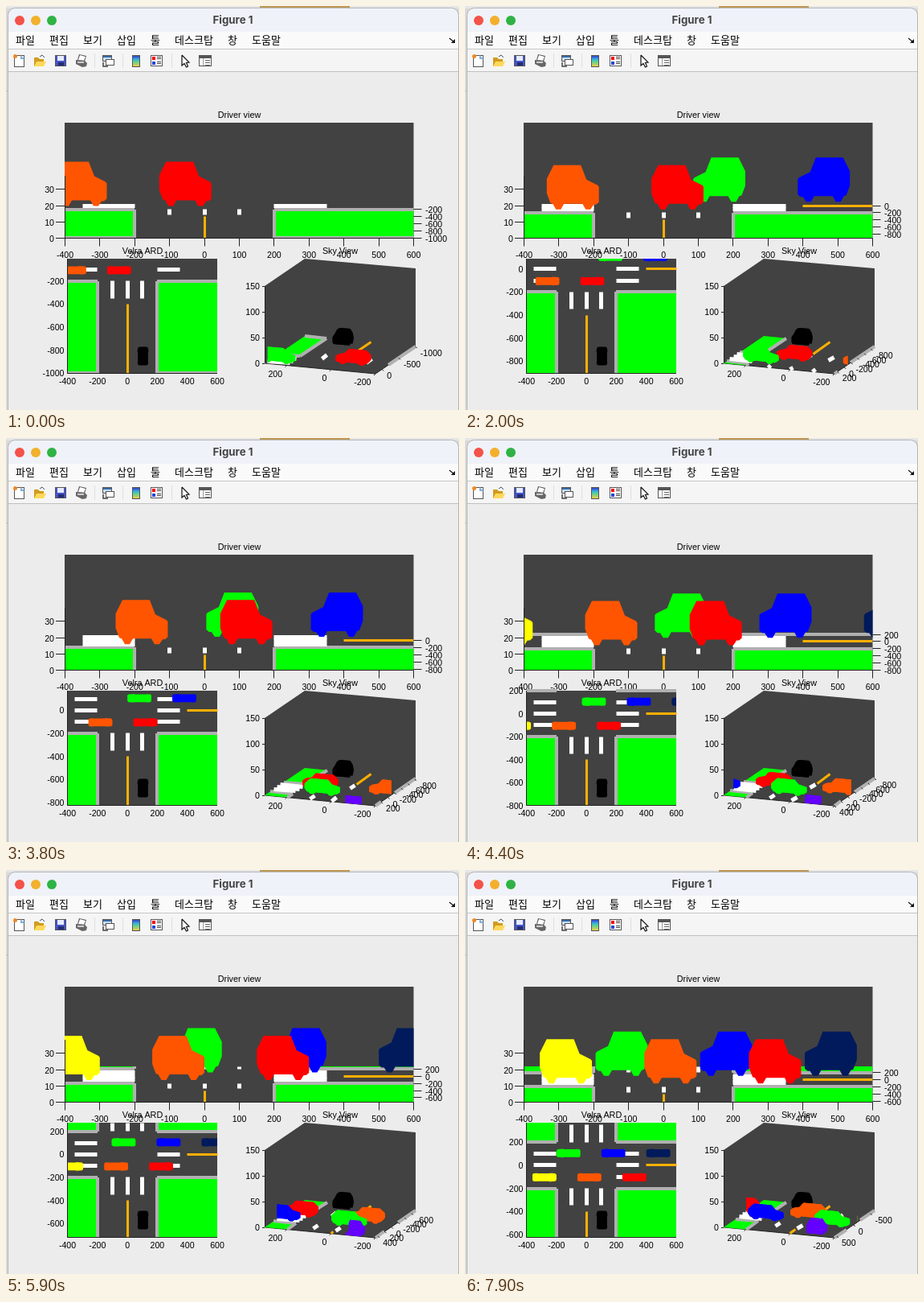
These frames come from a looping animation (564 by 502 pixels, 8000 ms). An HTML page with a canvas:

```html
<!DOCTYPE html>
<html lang="ko">
<head>
<meta charset="utf-8">
<style>
html, body { margin: 0; width: 100%; height: 100%; overflow: hidden; background: #ececec; }
canvas { display: block; width: 564px; height: 502px; }
</style>
</head>
<body>
<canvas id="c" width="564" height="502"></canvas>
<script>
const g = document.getElementById('c').getContext('2d');
const PLOT = '"Liberation Sans", Arial, sans-serif';
const UI = '"Noto Sans CJK KR", "Noto Sans CJK", sans-serif';
const DARK = '#424242', GREEN = '#00ff00', GRAY = '#b0b0b0', WHITE = '#fff', AMBER = '#ffb000';
const RED = '#ff0000', ORANGE = '#ff5500', YELLOW = '#ffff00', BLUE = '#0000ff', NAVY = '#001a5c', VIOLET = '#6400ff';

function rect(color, x, y, w, h) { g.fillStyle = color; g.fillRect(x, y, w, h); }
function poly(color, pts) {
  g.beginPath();
  pts.forEach(p => g.lineTo(p[0], p[1]));
  g.closePath();
  g.fillStyle = color;
  g.fill();
}
function line(color, width, ...pts) {
  g.beginPath();
  pts.forEach(p => g.lineTo(p[0], p[1]));
  g.strokeStyle = color;
  g.lineWidth = width;
  g.stroke();
}
function dot(color, x, y, r) {
  g.beginPath();
  g.arc(x, y, r, 0, 7);
  g.fillStyle = color;
  g.fill();
}
function text(s, x, y, align = 'center', font = '10.8px ' + PLOT, color = '#000') {
  g.font = font;
  g.textAlign = align;
  g.textBaseline = 'alphabetic';
  g.fillStyle = color;
  g.fillText(s, x, y);
}
const label = (v, x, y, align) => text(String(v), x, y + 4, align, '10.6px ' + PLOT);
function clipped(x, y, w, h, draw) {
  g.save();
  g.beginPath();
  g.rect(x, y, w, h);
  g.clip();
  draw();
  g.restore();
}
function ticks(lo, hi, step) {
  const out = [];
  for (let v = Math.ceil(lo / step) * step; v <= hi; v += step) out.push(v);
  return out;
}
const clamp = (v, lo, hi) => Math.max(lo, Math.min(hi, v));
const pixel = v => Math.floor(v) + 0.5;

// ---- world: lawns reach from 200 to 1000 on each side of the crossing ----
const EDGE = 1000;
const roads = [];
for (const s of [-1, 1]) {
  for (const r of [-1, 1]) {
    roads.push([GRAY, 4, s * 200, r * 200, s * EDGE, r * 200]);
    roads.push([GRAY, 4, s * 200, r * EDGE, s * EDGE, r * EDGE]);
    roads.push([GRAY, 4, s * 200, r * 200, s * 200, r * EDGE]);
  }
  for (const k of [-100, 0, 100]) {
    roads.push([WHITE, 5, s * 200, k, s * 350, k]);
    roads.push([WHITE, 5, k, s * 200, k, s * 350]);
  }
  roads.push([AMBER, 3, 0, s * 400, 0, s * EDGE]);
  roads.push([AMBER, 3, s * 400, 0, s * EDGE, 0]);
}

function ground(P, x0, x1, y0, y1) {
  const cx = x => clamp(x, x0, x1), cy = y => clamp(y, y0, y1);
  for (const s of [-1, 1]) for (const r of [-1, 1]) {
    const a = cx(s * 200), b = cx(s * EDGE), c = cy(r * 200), d = cy(r * EDGE);
    if (a !== b && c !== d) poly(GREEN, [P(a, c, 0), P(b, c, 0), P(b, d, 0), P(a, d, 0)]);
  }
  for (const [color, w, ax, ay, bx, by] of roads) {
    if (Math.max(ax, bx) < x0 || Math.min(ax, bx) > x1) continue;
    if (Math.max(ay, by) < y0 || Math.min(ay, by) > y1) continue;
    const snap = w % 2 ? pixel : Math.round;
    line(color, w, P(cx(ax), cy(ay), 0).map(snap), P(cx(bx), cy(by), 0).map(snap));
  }
}

// side outline of a car facing right, as [along, height]
const SIDE = [[-24, 55], [10, 55], [17, 37], [31, 30], [32.5, 28], [32.5, 9], [29, 6], [26, 6], [22, 0],
  [16, 0], [12, 7], [-11, 7], [-15, 0], [-21, 0], [-25, 7], [-28, 8], [-32.5, 20], [-32.5, 38]]
  .map(([u, z]) => [u / 0.4345, z / 2.02]);
const halfWidth = z => 36 - Math.max(0, z - 15);
const ROOF = [[-80, 24], [-74, 34], [-52, 36], [-44, 34], [28, 34], [36, 37], [52, 36], [72, 34], [80, 24]];
const TOP = ROOF.concat(ROOF.slice().reverse().map(([u, v]) => [u, -v]));

// lane cars, far lane first
function laneCars(n) {
  const west = [GREEN, BLUE, NAVY].map((color, i) => ({ color, x: 255 + 300 * i - 5 * n, y: 105, dir: -1 }));
  const east = [RED, ORANGE, YELLOW].map((color, i) => ({ color, x: -55 - 300 * i + 5 * n, y: -105, dir: 1 }));
  return west.concat(east);
}

// ---- views ----
function driverView(B, cars) {
  const L = 73, R = 507.5, Y = 288.5;
  const P = (x, y, z) => [L + 0.5 + (x + 400) * 0.434, Y - (y - B) * 0.0445 - z * 2.02];
  rect(DARK, L, 145, R - L, 144);
  clipped(L, 145, R - L, 144, () => {
    ground(P, -400, 600, B, B + 1000);
    for (const c of cars) {
      if (c.y - 35 < B + 1000) poly(c.color, SIDE.map(([u, z]) => P(c.x + c.dir * u, c.y, z)));
    }
  });
  line('#222', 1, [L + 0.5, 211], [L + 0.5, Y], [R, Y]);
  for (const v of ticks(-400, 600, 100)) {
    const x = P(v, B, 0)[0];
    line('#222', 1, [pixel(x), Y], [pixel(x), Y + 10]);
    label(v, x, 309);
  }
  for (const v of [0, 10, 20, 30]) {
    const y = P(0, B, v)[1];
    line('#222', 1, [62, pixel(y)], [L, pixel(y)]);
    label(v, 60, y + 0.5, 'right');
  }
  for (const v of ticks(B, B + 1000, 200)) {
    const y = P(0, v, 0)[1];
    line('#222', 1, [R, pixel(y)], [R + 10, pixel(y)]);
    label(v, 522, y + 0.5, 'left');
  }
  text('Driver view', 290.5, 139);
}

function topView(B, cars) {
  const L = 76, R = 263, T = 314, H = 143;
  const P = (x, y) => [L + 0.5 + (x + 400) * 0.1865, T + (B + 1000 - y) * 0.143];
  rect(DARK, L, T, R - L, H);
  clipped(L, T - 2, R - L + 2, H + 2, () => ground(P, -400, 600, B, B + 1000));
  clipped(L, T, R - L, H, () => {
    for (const c of cars) poly(c.color, TOP.map(([u, v]) => P(c.x + c.dir * u, c.y + v)));
    poly('#000', TOP.map(([u, v]) => P(104 + v, B + 154 + u)));
  });
  line('#222', 1, [L + 0.5, T], [L + 0.5, T + H - 0.5], [R, T + H - 0.5]);
  for (const v of ticks(-400, 600, 200)) label(v, P(v, 0)[0], 466);
  for (const v of ticks(B, B + 1000, 200)) label(v, 72.5, P(0, v)[1], 'right');
  text('Velra ARD', 170, 308);
}

function skyView(B, cars) {
  const N = B + 1200;
  const P = (x, y, z) => [322 + (300 - x) * 0.276 + (N - y) * 0.0417,
    444 + (300 - x) * 0.026 - (N - y) * 0.0283 - z * 0.64];

  // parts past the near end of the box fold down to the floor
  function solid(color, place) {
    const face = side => SIDE.map(([u, z]) => {
      const [x, y] = place(u, side * halfWidth(z));
      return y > N ? P(x, N, 0) : P(x, y, z);
    });
    const a = face(-1), b = face(1);
    poly(color, a);
    poly(color, b);
    a.forEach((p, i) => {
      const j = (i + 1) % a.length;
      poly(color, [p, a[j], b[j], b[i]]);
    });
  }

  poly(DARK, [[322, 348], [372, 314], [510, 326], [510, 423], [460, 457], [322, 444]]);
  line('#222', 1, [322.5, 348], [322.5, 444], [460, 457], [510, 423]);
  ground(P, -200, 300, B, N);
  solid('#000', (u, v) => [104 + v, B + 154 + u]);
  cars.slice().sort((a, b) => a.y - b.y).forEach(c => {
    clipped(322 + (N - c.y) * 0.0417, 314, 138, 150, () =>
      solid(c.color, (u, v) => [c.x + c.dir * u, c.y + v]));
  });
  if (N > 365) solid(VIOLET, (u, v) => [-100 + v, 440 - u]);

  for (const v of [0, 50, 100, 150]) {
    const y = 444 - v * 0.64;
    line('#222', 1, [319, pixel(y)], [322, pixel(y)]);
    label(v, 316, y, 'right');
  }
  for (const v of [200, 0, -200]) {
    const [x, y] = P(v, N, 0);
    line('#222', 1, [x, y], [x - 2, y + 2]);
    label(v, x - 5.5, y + 10, 'right');
  }
  const wide = ticks(B, N, 500);
  for (const v of wide.length > 2 ? wide : ticks(B, N, 200)) {
    const [x, y] = P(-200, v, 0);
    line('#222', 1, [x, y], [x + 2, y + 2]);
    label(v, x + 6, y + 8, 'left');
  }
  text('Sky View', 416, 308);
}

// ---- window ----
function page(x, y, w, h, color) {
  rect('#555', x, y, w, h);
  rect(color, x + 1, y + 1, w - 2, h - 2);
}

function toolbar() {
  // new
  page(10, 61, 13, 15, '#fff');
  poly('#7fb0e0', [[18, 61], [23, 66], [18, 66]]);
  dot('#f08a24', 11.5, 62.5, 2.5);
  // open
  poly('#d39b1d', [[35, 64], [40, 64], [42, 66], [47, 66], [47, 75], [35, 75]]);
  poly('#ffd95a', [[38, 69], [50, 69], [47, 75], [35, 75]]);
  line('#357', 1, [42, 63], [45, 61], [48, 64]);
  // save
  page(61, 61, 14, 14, '#4355c9');
  rect('#e8ecff', 64, 62, 8, 6);
  rect('#222c70', 65, 70, 7, 4);
  // print
  poly('#555', [[91, 60], [100, 62], [98, 69], [89, 67]]);
  poly('#fff', [[92, 61], [99, 63], [97, 68], [90, 67]]);
  poly('#666', [[87, 67], [98, 68], [101, 71], [100, 75], [95, 76], [87, 72]]);
  rect('#ccc', 89, 69, 8, 2);
  // link
  page(120, 61, 12, 8, '#c9ddf5');
  page(124, 66, 11, 8, '#fff');
  rect('#3b6ba5', 121, 62, 10, 2);
  line('#444', 1.5, [121, 70], [121, 75], [127, 75]);
  // colour scale
  page(157, 61, 10, 15, '#fff');
  const ramp = g.createLinearGradient(0, 62, 0, 75);
  ['#3b3bd0', '#35b6d8', '#7ad67a', '#f6c84a'].forEach((c, i) => ramp.addColorStop(i / 3, c));
  rect(ramp, 158, 62, 8, 13);
  // legend
  page(180, 61, 15, 14, '#fff');
  [[RED, 63], ['#2445d8', 69]].forEach(([c, y]) => {
    rect(c, 182, y, 4, 4);
    rect('#444', 188, y, 5, 1);
    rect('#444', 188, y + 2, 5, 1);
  });
  // pointer
  const arrow = [[219, 61], [219, 74], [222, 71.5], [224.5, 76], [226.5, 75], [224.5, 70.5], [228, 70]];
  poly('#fff', arrow);
  line('#111', 1.2, ...arrow, arrow[0]);
  // inspector
  page(240, 61, 16, 14, '#fff');
  rect('#555', 241, 62, 14, 3);
  rect('#999', 245, 65, 1, 9);
  for (const y of [67, 70, 73]) rect('#666', 248, y, 6, 1);
  for (const x of [110.5, 145.5, 206.5]) line('#dedede', 1, [x, 59], [x, 77]);
}

function frameWindow() {
  rect('#d9d9d9', 0, 0, 564, 502);
  rect('#e6e6e6', 0, 0, 564, 3);
  rect('#c09a58', 316, 0, 112, 2);
  rect('#bdbdbd', 0, 105, 3, 1);
  g.beginPath();
  g.roundRect(2.5, 2.5, 561, 510, 9);
  g.fillStyle = '#ececec';
  g.fill();
  g.save();
  g.clip();
  rect('#eff2f8', 2, 2, 562, 30);
  rect('#fafafa', 2, 32, 562, 21);
  rect('#c6c6c6', 2, 53, 562, 1);
  rect('#f5f5f5', 2, 54, 562, 27);
  rect('#c0c0c0', 2, 81, 562, 1);
  g.restore();
  g.strokeStyle = '#b4b4b4';
  g.lineWidth = 1;
  g.stroke();
  dot('#f4524a', 17, 18, 6);
  dot('#f2b02c', 37, 18, 6);
  dot('#2fb344', 57, 18, 6);
  text('Figure 1', 282.5, 22, 'center', 'bold 13.3px Inter, sans-serif', '#444');
  const menu = { 파일: 12, 편집: 54, 보기: 96, 삽입: 138, 툴: 180, 데스크탑: 210, 창: 276, 도움말: 306 };
  for (const name in menu) text(name, menu[name], 47, 'left', '13px ' + UI, '#000');
  line('#111', 1.2, [552, 40], [557.5, 44.5]);
  poly('#111', [[559, 41], [559, 46], [554, 46]]);
  toolbar();
}

// ticks of the 100 ms clock on which the simulation stands still
const SKIPS = [10, 26, 38, 75];

function draw(now) {
  const tick = Math.floor((now % 8000) / 100);
  const n = tick - SKIPS.filter(s => tick >= s).length;
  const B = -1005 + 5 * n, cars = laneCars(n);
  frameWindow();
  driverView(B, cars);
  topView(B, cars);
  skyView(B, cars);
}

const start = performance.now();
function loop() {
  draw(performance.now() - start);
  requestAnimationFrame(loop);
}
loop();
</script>
</body>
</html>
```
